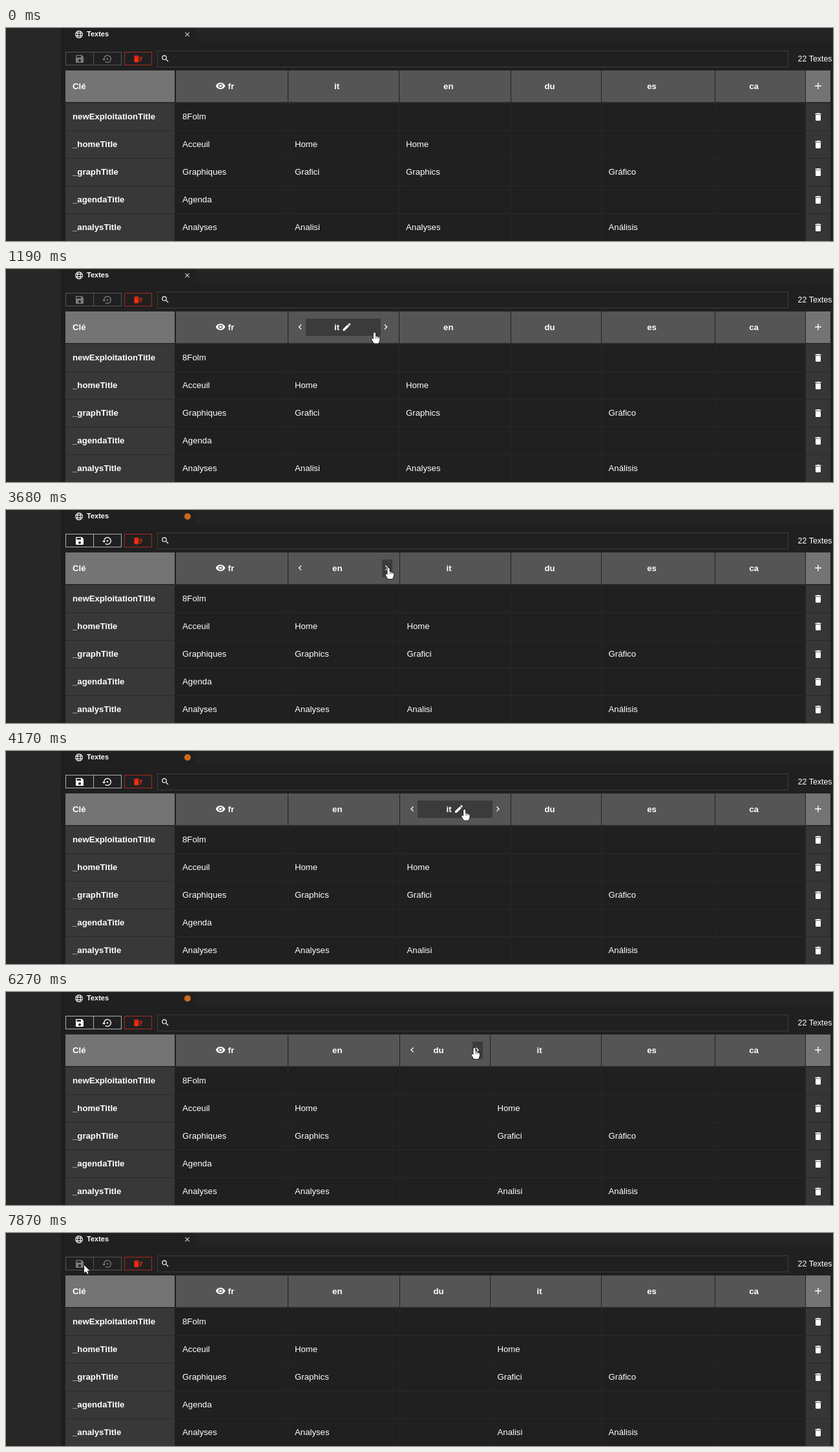
Recreate the animation shown at these times as an HTML page with a canvas. Size 1280x331 px, loop 8000 ms.

```html
<!DOCTYPE html>
<html lang="fr">
<head>
<meta charset="utf-8">
<title>Textes</title>
<style>
  html, body { margin: 0; width: 100%; height: 100%; overflow: hidden; background: #202020; }
  canvas { display: block; }
</style>
</head>
<body>
<canvas id="stage" width="1280" height="331"></canvas>
<script>
const ctx = document.getElementById('stage').getContext('2d', { alpha: false });
const LOOP = 8000;
const FONT = '"Liberation Sans", Arial, sans-serif';
const SWAP_1 = 2830, SWAP_2 = 5050, SAVED = 7520;

// Icons on a 24-unit grid, filled with the even-odd rule
const icons = {
  eye: 'M1 12C5 2 19 2 23 12C19 22 5 22 1 12Z M7 12a5 5 0 1 0 10 0a5 5 0 1 0-10 0Z M9 12a3 3 0 1 0 6 0a3 3 0 1 0-6 0Z',
  save: 'M4 3H17L21 7V20L20 21H4L3 20V4Z M5 5H15V9H5Z M9 16a3 3 0 1 0 6 0a3 3 0 1 0-6 0Z',
  restore: 'M0 12H8L4 16Z M10 12a2 2 0 1 0 4 0a2 2 0 1 0-4 0Z M3 12A9 9 0 1 1 6.5 19.1L7.9 17.7A7 7 0 1 0 5 12Z',
  sweep: 'M15 16h4v2h-4Z M15 8h7v2h-7Z M15 12h6v2h-6Z M3 8H13V18a2 2 0 0 1-2 2H5a2 2 0 0 1-2-2Z M2 5H5L6 4H10L11 5H14V7H2Z',
  search: 'M3 9.5a6.5 6.5 0 1 0 13 0a6.5 6.5 0 1 0-13 0Z M5 9.5a4.5 4.5 0 1 0 9 0a4.5 4.5 0 1 0-9 0Z M15.2 13.7L20.5 19L19 20.5L13.7 15.2Z',
  trash: 'M6 7H18V19a2 2 0 0 1-2 2H8a2 2 0 0 1-2-2Z M5 4H8.5L9.5 3H14.5L15.5 4H19V6H5Z',
  pencil: 'M3 17.25L14.06 6.19L17.81 9.94L6.75 21H3Z M15.1 5.1L17.7 2.8L21.1 6.3L18.9 8.9Z',
  plus: 'M11 5h2v6h6v2h-6v6h-2v-6H5v-2h6Z',
  close: 'M5 6.4L6.4 5L12 10.6L17.6 5L19 6.4L13.4 12L19 17.6L17.6 19L12 13.4L6.4 19L5 17.6L10.6 12Z',
  left: 'M15.4 7.4L14 6L8 12L14 18L15.4 16.6L10.8 12Z',
  right: 'M8.6 7.4L10 6L16 12L10 18L8.6 16.6L13.2 12Z'
};
for (const name in icons) icons[name] = new Path2D(icons[name]);

const handShape = new Path2D('M-1.6 1Q0-1 1.6 1V6L6 7Q8.2 7.6 8 9.5V12L6.3 17H-.8L-4.3 11.2Q-4.6 9-3 9.4L-1.6 11Z');
const arrowShape = new Path2D('M0 0V12L2.8 9.5L4.7 13.7L6.6 12.9L4.8 8.8H8.6Z');

const rowKeys = ['newExploitationTitle', '_homeTitle', '_graphTitle', '_agendaTitle', '_analysTitle'];
const languages = {
  fr: { width: 174, cells: ['8Folm', 'Acceuil', 'Graphiques', 'Agenda', 'Analyses'] },
  it: { width: 172, cells: ['', 'Home', 'Grafici', '', 'Analisi'] },
  en: { width: 173.5, cells: ['', 'Home', 'Graphics', '', 'Analyses'] },
  du: { width: 140, cells: [] },
  es: { width: 176, cells: ['', '', 'Gráfico', '', 'Análisis'] },
  ca: { width: 140, cells: [] }
};

// Pointer moves: [start, end, from x, from y, to x, to y]
const STEP = 70;
const moves = [
  [480, 1190, 668, 345, 569, 95],
  [1190, 1330, 569, 95, 575, 93],
  [1600, 1880, 575, 93, 589, 90],
  [3610, 3680, 589, 90, 592, 90],
  [3680, 4380, 592, 90, 760, 91],
  [5990, 6270, 760, 91, 725, 87],
  [6270, 6830, 725, 87, 215, 51],
  [6830, 6970, 215, 51, 163, 54],
  [6970, 7170, 163, 54, 121, 50]
];

function pointerAt(t) {
  if (t < 550) return { x: -99, y: -99 };
  const [start, end, x0, y0, x1, y1] = moves.filter(m => m[0] + STEP - 10 <= t).pop();
  const stepped = Math.floor((t - start + 10) / STEP) * STEP;
  const p = Math.min(1, stepped / (end - start));
  return { x: x0 + (x1 - x0) * p, y: y0 + (y1 - y0) * p };
}

const inside = (p, x, y, w, h) => p.x >= x && p.x < x + w && p.y >= y && p.y < y + h;

function box(x, y, w, h, color) {
  ctx.fillStyle = color;
  ctx.fillRect(x, y, w, h);
}

function frame(x, y, w, h, color) {
  ctx.strokeStyle = color;
  ctx.lineWidth = 1;
  ctx.strokeRect(x + 0.5, y + 0.5, w - 1, h - 1);
}

function text(str, x, y, { size = 13.2, bold = false, align = 'left' } = {}) {
  ctx.font = `${bold ? 'bold ' : ''}${size}px ${FONT}`;
  ctx.textAlign = align;
  ctx.fillStyle = '#fff';
  ctx.fillText(str, x, y);
}

function icon(name, cx, cy, size = 16, color = '#fff') {
  ctx.save();
  ctx.translate(cx - size / 2, cy - size / 2);
  ctx.scale(size / 24, size / 24);
  ctx.fillStyle = color;
  ctx.fill(icons[name], 'evenodd');
  ctx.restore();
}

function drawGlobe(x, y) {
  ctx.strokeStyle = '#eee';
  ctx.lineWidth = 1.1;
  ctx.beginPath();
  ctx.arc(x, y, 5.4, 0, 7);
  ctx.moveTo(x + 2.5, y);
  ctx.ellipse(x, y, 2.5, 5.4, 0, 0, 7);
  for (const dy of [-1.9, 1.9]) {
    ctx.moveTo(x - 5, y + dy);
    ctx.lineTo(x + 5, y + dy);
  }
  ctx.stroke();
}

function drawTabs(dirty) {
  box(0, 0, 1280, 331, '#202021');
  box(0, 0, 85, 331, '#272727');
  box(0, 41, 85, 1, '#222');
  box(85, 0, 5, 331, '#1d1d1d');
  box(293, 0, 987, 21, '#242425');
  drawGlobe(113, 10);
  text('Textes', 125, 13, { size: 11, bold: true });
  if (dirty) {
    ctx.fillStyle = '#c96a1c';
    ctx.beginPath();
    ctx.arc(281, 10, 5, 0, 7);
    ctx.fill();
  } else {
    icon('close', 280.5, 10, 12, '#ddd');
  }
}

function drawToolbar(dirty, sweepHover) {
  const edge = dirty ? '#b0b0b0' : '#555';
  const glyph = dirty ? '#fff' : '#7c7c7c';
  frame(92, 37, 44, 21, edge);
  frame(135, 37, 44, 21, edge);
  icon('save', 114, 48, 16, glyph);
  icon('restore', 157, 48, 16, glyph);
  if (sweepHover) box(183, 37, 43, 21, '#ff2f10');
  else frame(183, 37, 43, 21, '#a82a1b');
  icon('sweep', 204.5, 48, 16, sweepHover ? '#fff' : '#fb2c0e');
  frame(234, 35, 977, 26, '#3d3d3d');
  icon('search', 246.5, 47.5, 14);
  text('22 Textes', 1225.5, 51.5, { size: 12.4 });
}

// Returns true when the pointer is over a clickable part
function drawHeader(name, x, w, pointer) {
  const mid = x + w / 2;
  const hovered = inside(pointer, x, 66, w, 49);
  const spots = [[x + 12, 16], [x + 28, w - 56], [x + w - 27.5, 16]];
  const hit = spots.findIndex(([sx, sw]) => inside(pointer, sx, 77, sw, 27));
  box(Math.round(x) + 1, 66, Math.round(x + w) - Math.round(x) - 1, 49, '#555');
  if (hit >= 0) box(Math.round(spots[hit][0]), 77, Math.round(spots[hit][1]), 27, '#3b3b3b');
  if (hovered) {
    icon('left', x + 19.7, 90);
    icon('right', x + w - 19.7, 90);
  }
  if (name === 'fr') {
    icon('eye', mid - 16.5, 90);
    text(name, mid - 5, 95, { bold: true });
  } else {
    text(name, mid - 9.5, 95, { bold: true, align: 'center' });
  }
  if (hit === 1) icon('pencil', mid + 6, 90);
  return hit >= 0;
}

function drawTable(order, pointer) {
  let clickable = false;
  box(92, 66, 169, 49, '#747474');
  text('Clé', 103, 95, { bold: true });
  box(1238, 66, 38, 49, '#747474');
  icon('plus', 1257, 90, 17);
  box(92, 115, 1184, 2, '#2a2a2a');

  rowKeys.forEach((key, i) => {
    const top = 117 + 43 * i;
    box(92, top, 169, 42, '#383838');
    box(1238, top, 38, 42, '#363636');
    box(92, top + 42, 1184, 1, '#292929');
    text(key, 103, top + 25, { bold: true });
    icon('trash', 1257, top + 21);
  });

  let x = 261.5;
  for (const name of order) {
    const { width, cells } = languages[name];
    if (drawHeader(name, x, width, pointer)) clickable = true;
    box(Math.round(x + width), 117, 1, 214, '#272727');
    cells.forEach((cell, i) => text(cell, x + 11.5, 142 + 43 * i));
    x += width;
  }
  return clickable;
}

function drawPointer({ x, y }, hand) {
  const shape = hand ? handShape : arrowShape;
  ctx.save();
  ctx.translate(x, y);
  ctx.lineJoin = 'round';
  ctx.lineWidth = 1.6;
  ctx.strokeStyle = '#111';
  ctx.stroke(shape);
  ctx.fillStyle = '#fff';
  ctx.fill(shape);
  if (hand) {
    ctx.lineWidth = 0.6;
    ctx.beginPath();
    for (const dx of [1.7, 3.8, 5.9]) {
      ctx.moveTo(dx, 6.8);
      ctx.lineTo(dx, 9.5);
    }
    ctx.stroke();
  }
  ctx.restore();
}

function columnOrder(t) {
  if (t < SWAP_1) return ['fr', 'it', 'en', 'du', 'es', 'ca'];
  if (t < SWAP_2) return ['fr', 'en', 'it', 'du', 'es', 'ca'];
  return ['fr', 'en', 'du', 'it', 'es', 'ca'];
}

function render(t) {
  const dirty = t >= SWAP_1 && t < SAVED;
  const pointer = pointerAt(t);
  const sweepHover = inside(pointerAt(t - 60), 183, 37, 43, 21);
  drawTabs(dirty);
  drawToolbar(dirty, sweepHover);
  const overHeader = drawTable(columnOrder(t), pointer);
  const overButton = inside(pointer, dirty ? 92 : 183, 37, dirty ? 134 : 43, 21);
  drawPointer(pointer, overHeader || overButton);
}

const began = performance.now();
function tick() {
  render((performance.now() - began) % LOOP);
  requestAnimationFrame(tick);
}
tick();
</script>
</body>
</html>
```
